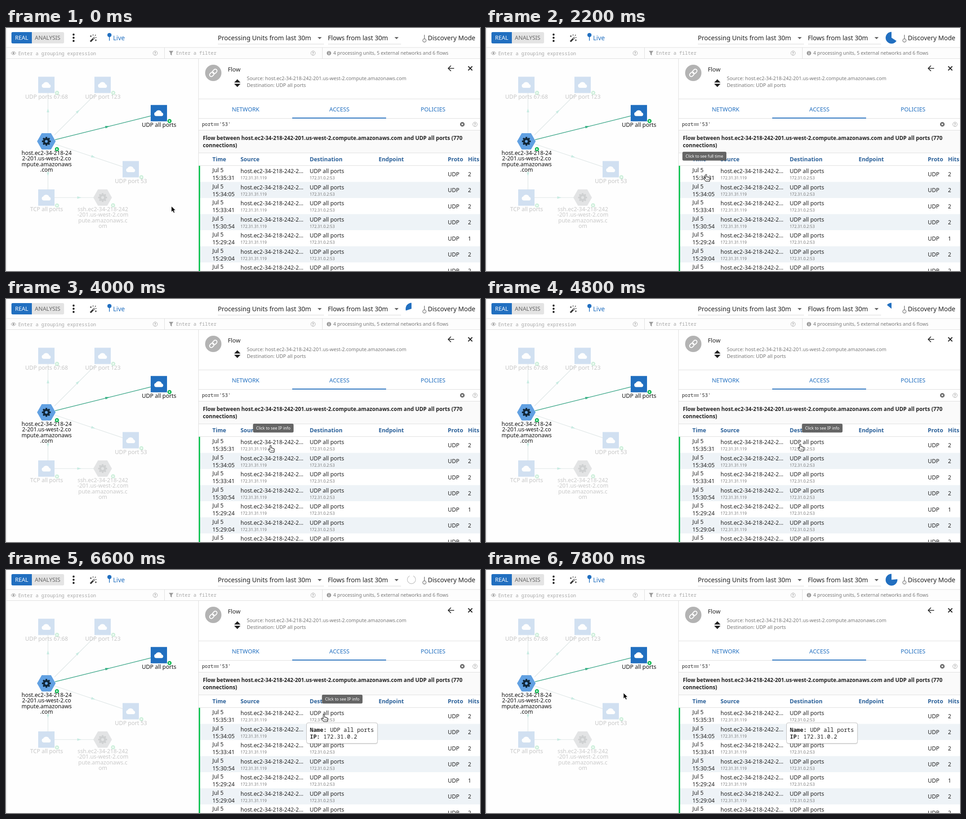
An HTML page that plays this animation: 1045x536 px, repeating every 8 s.

```html
<!DOCTYPE html>
<html lang="en">
<head>
<meta charset="utf-8">
<title>Flow access log</title>
<style>
html, body { margin: 0; width: 100%; height: 100%; overflow: hidden; background: #fff; }
svg { display: block; width: 1045px; height: 536px; }
text { font-family: "Noto Sans", sans-serif; font-size: 12.4px; fill: #222; white-space: pre; }
.mono { font-family: "Noto Sans Mono", monospace; }
</style>
</head>
<body>
<svg id="stage" viewBox="0 0 1045 536" xmlns="http://www.w3.org/2000/svg"></svg>
<script>
const BLUE = '#216fc0', GREEN = '#12b954';
const stage = document.getElementById('stage');

const text = (x, y, s, o = {}) =>
  `<text x="${x}" y="${y}" style="font-size:${o.size || 12.4}px;font-weight:${o.weight || 400};fill:${o.fill || '#222'}"` +
  ` text-anchor="${o.anchor || 'start'}"${o.mono ? ' class="mono"' : ''}>${s}</text>`;
const rect = (x, y, w, h, fill, extra = '') =>
  `<rect x="${x}" y="${y}" width="${w}" height="${h}" fill="${fill}" ${extra}/>`;
const circle = (x, y, r, fill, extra = '') =>
  `<circle cx="${x}" cy="${y}" r="${r}" fill="${fill}" ${extra}/>`;
const line = (x1, y1, x2, y2, color = '#dedede', w = 1) =>
  `<path d="M${x1} ${y1}L${x2} ${y2}" stroke="${color}" stroke-width="${w}" fill="none"/>`;
const path = (d, fill, extra = '') => `<path d="${d}" fill="${fill}" ${extra}/>`;
const group = (s, attrs) => `<g ${attrs}>${s}</g>`;

function help(x, y) {
  return circle(x, y, 4.8, 'none', 'stroke="#a9a9a9"') +
    text(x, y + 3, '?', { size: 8, weight: 700, fill: '#a0a0a0', anchor: 'middle' });
}

function toolbar() {
  const big = { size: 14.1 };
  const drop = x => path(`M${x - 4.5} 20h9l-4.5 4.8z`, '#666');
  return rect(12, 9, 116, 25, '#e4e4e4', 'rx="3"') +
    path('M15 9H57V34H15Q12 34 12 31V12Q12 9 15 9Z', BLUE) +
    text(34.5, 26, 'REAL', { fill: '#fff', weight: 500, anchor: 'middle' }) +
    text(91.7, 26, 'ANALYSIS', { fill: '#666', anchor: 'middle' }) +
    [14.5, 21.5, 28.5].map(y => circle(149, y, 2.2, '#222')).join('') +
    // wand
    path('M186 30L195.5 20.5', 'none', 'stroke="#333" stroke-width="3.4"') +
    path('M192 24L195.5 20.5', 'none', 'stroke="#fff" stroke-width="1.2"') +
    path('M187 16v4M185 18h4M192 14v3M198 15l-2 2M200 21h-3M198 25v4M196 27h4', 'none', 'stroke="#333" stroke-width="1.2"') +
    circle(228, 15.5, 4.6, BLUE) + line(228, 18, 228, 28, BLUE, 1.5) +
    text(236, 26.7, 'Live', { size: 14, fill: BLUE }) +
    text(467, 26.7, 'Processing Units from last 30m', big) + drop(691.5) +
    text(709.5, 26.7, 'Flows from last 30m', big) + drop(861) +
    line(467, 35.5, 701, 35.5, '#d8d8d8') + line(710, 35.5, 871, 35.5, '#d8d8d8') +
    line(922.5, 15, 922.5, 24, '#777', 1.4) +
    circle(922.5, 27.5, 3.6, '#fff', 'stroke="#777" stroke-width="1.3"') +
    text(930, 26.7, 'Discovery Mode', { size: 14 });
}

function filterBar() {
  const hint = { size: 10.6, mono: true, fill: '#a6a6a6' };
  return rect(0, 43, 1045, 25, '#fdfdfd') +
    line(0, 43, 1045, 43) + line(0, 67.5, 1045, 67.5) +
    line(349.5, 43, 349.5, 67) + line(697.5, 43, 697.5, 67) +
    path('M11 55.5Q16.5 48.5 22 55.5Q16.5 62.5 11 55.5Z', 'none', 'stroke="#999"') + circle(16.5, 55.5, 2, '#999') +
    text(27, 59.5, 'Enter a grouping expression', hint) + help(329, 55.5) +
    path('M359 50.5H369L365.5 55V60.5L362.5 58.5V55Z', '#999') +
    text(375, 58.8, 'Enter a filter', hint) + help(677, 55.5) +
    circle(712, 55.5, 4.8, '#999') + rect(711.3, 54.7, 1.5, 3.8, '#fff') + rect(711.3, 52.3, 1.5, 1.5, '#fff') +
    text(721.5, 59.3, '4 processing units, 5 external networks and 6 flows', { size: 10.6, fill: '#777' });
}

const cloud = (x, y) => path(
  `M${x - 6} ${y + 6.5}a4.6 4.6 0 0 1 -.8 -9a7.2 7.2 0 0 1 13.2 1.3a4 4 0 0 1 .4 7.7z`, '#fff');
const badge = (x, y) => circle(x, y, 4.9, '#fff') + circle(x, y, 4.5, GREEN) +
  path(`M${x - 1.4} ${y - 2.3}l3.8 2.3l-3.8 2.3z`, '#fff');
const label = (x, y, rows, fill) => rows.map((s, i) =>
  text(x, y + i * 12.4, s, { anchor: 'middle', fill })).join('');

function gear(x, y, fill, hole) {
  const teeth = [...Array(8)].map((_, i) =>
    rect(x - 2, y - 9.8, 4, 5, fill, `rx="1" transform="rotate(${i * 45} ${x} ${y})"`)).join('');
  return teeth + circle(x, y, 7.4, fill) + circle(x, y, 3.1, hole);
}
const hex = (x, y, fill) =>
  path(`M${x - 20.5} ${y}l10.3 -18h20.4l10.3 18l-10.3 18h-20.4z`, fill);

function cloudNode(x, y, name, faded) {
  return group(rect(x - 18, y - 18, 36, 36, BLUE) + cloud(x, y), faded ? 'opacity=".2"' : '') +
    group(badge(x + 23.5, y + 17.5), faded ? 'opacity=".2"' : '') +
    label(x + .5, y + 30, [name], faded ? '#c6c6c6' : '#111');
}

function edge(x1, y1, x2, y2, mx, my, active) {
  const deg = Math.atan2(y2 - y1, x2 - x1) * 180 / Math.PI;
  return line(x1, y1, x2, y2, active ? '#42a98c' : '#dde5e5', active ? 1.5 : 1.2) +
    path('M-4 -2.8L5 0L-4 2.8Z', active ? '#36b184' : '#c8ebe2', `transform="translate(${mx} ${my}) rotate(${deg})"`);
}

function graph() {
  return rect(0, 68, 424, 468, '#fefefe') + line(1.5, 0, 1.5, 536, '#e3e3e5') +
    edge(92.5, 232, 92.5, 144, 92.5, 182) +
    edge(107, 236, 197, 146, 158.5, 184) +
    edge(108, 256, 257, 306, 192, 284) +
    edge(92.5, 318, 92.5, 356, 92.5, 322) +
    edge(107, 374, 193, 374, 161, 374) +
    edge(108, 246.5, 319, 194, 223, 217.8, true) +
    cloudNode(89, 125.5, 'UDP ports 67:68', true) +
    cloudNode(213, 125.5, 'UDP port 123', true) +
    cloudNode(275, 311.5, 'UDP port 53', true) +
    cloudNode(89, 374, 'TCP all ports', true) +
    cloudNode(337, 187.8, 'UDP all ports') +
    hex(213, 374, '#e3e4e5') + gear(213, 374, '#cfd1d2', '#e3e4e5') +
    group(badge(236, 391), 'opacity=".2"') +
    label(213.5, 404, ['ssh.ec2-34-218-242', '-201.us-west-2.com', 'pute.amazonaws.c', 'om'], '#c9c9c9') +
    hex(89, 250, '#62a1e2') + gear(89, 250, '#12283b', '#62a1e2') + badge(112.3, 267.3) +
    label(89.5, 280, ['host.ec2-34-218-24', '2-201.us-west-2.co', 'mpute.amazonaws', '.com'], '#111');
}

function panelHead() {
  const host = 'host.ec2-34-218-242-201.us-west-2.compute.amazonaws.com';
  const small = { size: 10.79, fill: '#777' };
  const tab = (x, s) => text(x, 183.5, s, { size: 12.6, fill: BLUE, anchor: 'middle' });
  const bold = { size: 11.8, weight: 700 };
  const link = group(
    '<rect x="-10" y="-3.8" width="11" height="7.6" rx="3.8"/><rect x="-1" y="-3.8" width="11" height="7.6" rx="3.8"/>',
    'transform="translate(457 99) rotate(-45)" fill="none" stroke="#fff" stroke-width="2"');
  return rect(424, 68, 621, 468, '#fff') + line(424.5, 68, 424.5, 536) +
    circle(457, 99, 18, '#b3b3b3') + link +
    text(489, 95.8, 'Flow', { size: 13, weight: 500 }) +
    path('M503 120.2L510 113L517 120.2ZM503 123L510 130.2L517 123Z', '#222') +
    text(531, 114.6, 'Source: ' + host, small) + text(531, 129.8, 'Destination: UDP all ports', small) +
    path('M988 89H975M981 83L975 89L981 95', 'none', 'stroke="#222" stroke-width="1.7"') +
    path('M1019 84.5L1028 93.5M1028 84.5L1019 93.5', 'none', 'stroke="#222" stroke-width="2"') +
    line(425, 156.5, 1045, 156.5) + line(425, 199.5, 1045, 199.5) +
    tab(528.3, 'NETWORK') + tab(735, 'ACCESS') + tab(941.5, 'POLICIES') +
    rect(631, 197.6, 207, 2, BLUE) +
    text(432, 216, 'port', { size: 10.6, mono: true }) +
    path('M458 211.2H469.3M458 214.2H469.3', 'none', 'stroke="#333"') +
    text(470, 216, "'53'", { size: 10.6, mono: true }) +
    circle(1006, 212.5, 5, '#666') +
    path('M1004.2 210.7l3.6 3.6m0 -3.6l-3.6 3.6', 'none', 'stroke="#fff" stroke-width="1.3"') + help(1034, 212.5) +
    rect(425, 225.5, 620, 50, '#fafafa') + line(425, 225.5, 1045, 225.5) + line(425, 275.5, 1045, 275.5) +
    text(434, 247, `Flow between ${host} and UDP all ports (770`, bold) + text(434, 263, 'connections)', bold);
}

function table() {
  const cols = [[455, 'Time'], [517, 'Source'], [669.5, 'Destination'], [821.5, 'Endpoint'], [974, 'Proto'], [1018.5, 'Hits']];
  const times = ['35:31', '34:05', '33:41', '30:54', '29:24', '29:04', '28:51'];
  const head = cols.map(([x, s]) => text(x, 294, s, { weight: 700, fill: '#2a6099' })).join('');
  const rows = times.map((t, i) => {
    const y = 304 + i * 35.5, ip = { size: 8.9, fill: '#777' };
    return rect(428, y, 617, 35.5, i % 2 ? '#eef3f7' : '#fff') +
      text(455, y + 14.2, 'Jul 5') + text(455, y + 31, '15:' + t) +
      text(517, y + 16.2, 'host.ec2-34-218-242-2...') + text(517, y + 30, '172.31.31.119', ip) +
      text(669.5, y + 16.2, 'UDP all ports') + text(669.5, y + 30, '172.31.0.2:53', ip) +
      text(974, y + 22.5, 'UDP') + text(1018.5, y + 22.5, i === 4 ? 1 : 2);
  }).join('');
  return head + line(425, 303.5, 1045, 303.5) + rows + rect(425, 304, 3, 232, '#0ec653');
}

function tip(id, x, y, w, s) {
  return group(rect(x, y, w, 19.5, '#606060', 'rx="3" opacity=".97"') +
    text(x + w / 2, y + 13, s, { size: 8.85, fill: '#fff', anchor: 'middle' }), `id="${id}"`);
}

function overlays() {
  const mono = { mono: true }, strong = { mono: true, weight: 700 };
  const popup = rect(663.5, 338.5, 156, 46, '#000', 'rx="4" opacity=".09"') +
    rect(662.5, 337, 156.5, 45.5, '#fff', 'rx="4" stroke="#bcbcbc"') +
    text(670, 356.5, 'Name:', strong) + text(714.6, 356.5, 'UDP all ports', mono) +
    text(670, 372, 'IP:', strong) + text(699.8, 372, '172.31.0.2', mono);
  const arrow = path('M0 0V13L3 10.3L5.2 15L7.6 13.9L5.5 9.3H9.5Z', '#000', 'stroke="#fff" stroke-width=".9"');
  const hand = path('M-2.2 1V-5.5Q-2.2 -7.2 -.8 -7.2Q.6 -7.2 .6 -5.5V-1.5Q2.8 -2.4 3.3 -.7Q5.3 -1.2 5.8 .4Q7.8 .2 7.8 2V5L6.5 8.5H-1L-5.3 3Q-6.4 1.2 -4.8 .6Q-3.6 .3 -2.2 2.6Z',
    '#fff', 'transform="translate(-1 0)" stroke="#222" stroke-width="1.1" stroke-linejoin="round"') +
    line(-.4, 3, -.4, 6.5, '#333', .8) + line(2, 3, 2, 6.5, '#333', .8) + line(4.4, 3, 4.4, 6.5, '#333', .8);
  return tip('timeTip', 433, 273, 97, 'Click to see full time') +
    tip('srcTip', 544.5, 275, 89.5, 'Click to see IP info') +
    tip('dstTip', 696.5, 275, 89.5, 'Click to see IP info') +
    group(popup, 'id="popup"') +
    path('', BLUE, 'id="pie"') +
    path('M898 13.1A9 9 0 1 1 890 13', 'none', 'id="ring" stroke="#bdbdbd" stroke-width="1.2"') +
    group(arrow, 'id="arrow"') + group(hand, 'id="hand"');
}

stage.innerHTML = rect(0, 0, 1045, 536, '#fff') + toolbar() + filterBar() + graph() + panelHead() + table() + overlays();

const el = id => document.getElementById(id);
const show = (id, on) => el(id).setAttribute('visibility', on ? 'visible' : 'hidden');

// time, x, y of the pointer
const track = [
  [0, 364.5, 393], [1300, 364.5, 393], [2000, 487, 330], [3200, 487, 330], [3800, 585, 330],
  [4300, 585, 330], [4800, 694.5, 327], [5400, 702.5, 326], [6700, 702.5, 326], [7700, 303, 271]
];

function pointer(t) {
  const i = track.findIndex(k => k[0] > t);
  if (i < 0) return track[track.length - 1].slice(1);
  const [t0, x0, y0] = track[i - 1], [t1, x1, y1] = track[i];
  const p = (t - t0) / (t1 - t0), e = p * p * (3 - 2 * p);
  return [x0 + (x1 - x0) * e, y0 + (y1 - y0) * e];
}

function drawTimer(t) {
  const start = t < 6600 ? 500 : 6620, gone = (t - start) / 5000;
  const running = gone >= 0 && gone < 1;
  show('pie', running);
  show('ring', !running && ((t >= 200 && t < 500) || t >= 6200));
  if (!running) return;
  const a = gone * 2 * Math.PI;
  const x = 894 + 13 * Math.sin(a), y = 21.5 - 13 * Math.cos(a);
  el('pie').setAttribute('d', `M894 21.5L${x} ${y}A13 13 0 ${gone < .5 ? 1 : 0} 1 894 8.5Z`);
}

function draw(ms) {
  const t = Math.floor(ms % 8000 / 200) * 200;
  const [x, y] = pointer(t);
  const inRow = y > 304 && y < 340;
  const over = (a, b) => inRow && x >= a && x < b;
  const onCell = over(450, 822);
  show('timeTip', over(450, 512));
  show('srcTip', over(512, 665));
  show('dstTip', over(665, 822));
  show('popup', t >= 5600);
  show('hand', onCell);
  show('arrow', !onCell);
  el(onCell ? 'hand' : 'arrow').setAttribute('transform', `translate(${x} ${y})`);
  drawTimer(t);
}

let begin;
function tick(now) {
  begin ??= now;
  draw(now - begin);
  requestAnimationFrame(tick);
}
draw(0);
requestAnimationFrame(tick);
</script>
</body>
</html>
```
